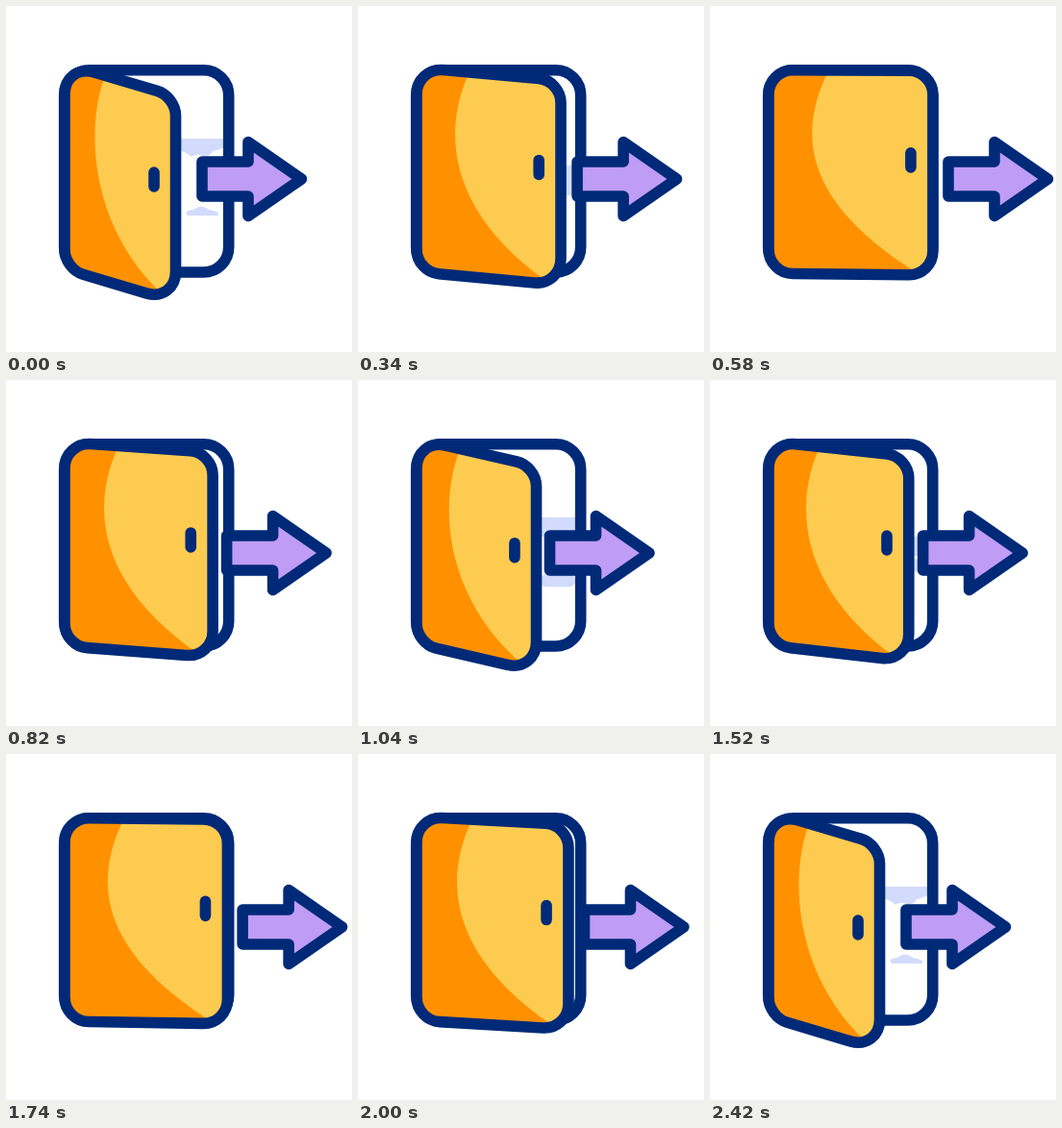
Animation of 360 by 360 pixels, one loop 2820 ms. Source, as an HTML page:

```html
<!DOCTYPE html>
<html lang="en">
<head>
<meta charset="utf-8">
<title>Exit door</title>
<style>
  html, body { margin: 0; width: 100%; height: 100%; overflow: hidden; background: #fff; }
  svg { display: block; width: 100vw; height: 100vh; }
  .line { stroke: #002a78; stroke-width: 11.6; stroke-linejoin: round; stroke-linecap: round; }
</style>
</head>
<body>
<svg viewBox="0 0 360 360">
  <defs><clipPath id="clip"><path id="clipDoor"/></clipPath></defs>
  <g fill="#d2dbfc">
    <g id="wisps">
      <path d="M180 138H226V147Q222 150 215 151Q213 157 205 156Q198 153 193 157Q188 152 180 150Z"/>
      <path d="M187 215Q190 212 195 212Q203 205 211 212Q217 213 221 215V218H189Z"/>
    </g>
    <g id="bars">
      <rect id="upper" x="180" width="48" height="20"/>
      <rect id="lower" x="189" width="37" height="13" rx="6.5"/>
    </g>
  </g>
  <rect class="line" fill="none" x="60.7" y="66.7" width="171" height="210.3" rx="26"/>
  <path id="arrow" class="line" fill="#bf9cf5" d="M0 162H48V141.5L103.5 180L48 218.5V198H0Z"/>
  <path id="door" fill="#ff9100"/>
  <path id="light" fill="#fdcb50" clip-path="url(#clip)"/>
  <path id="edge" class="line" fill="none"/>
  <path id="knob" class="line" fill="none"/>
</svg>
<script>
const LOOP = 2820, MOVING = 2420;
const REST_X = 204;
const $ = id => document.getElementById(id);
const mix = (a, b, p) => a + (b - a) * p;
const ramp = (t, a, b) => Math.min(1, Math.max(0, (t - a) / (b - a)));
const wave = (t, period) => (1 - Math.cos(2 * Math.PI * t / period)) / 2;

// Closed path through the corners, each rounded by its own radius
function roundedPath(corners) {
  const n = corners.length;
  const toward = (from, to, d) => {
    const k = d / Math.hypot(to.x - from.x, to.y - from.y);
    return `${mix(from.x, to.x, k)} ${mix(from.y, to.y, k)}`;
  };
  return corners.map((c, i) => {
    const prev = corners[(i + n - 1) % n], next = corners[(i + 1) % n];
    const handle = c.r * .45;
    return `${i ? 'L' : 'M'}${toward(c, prev, c.r)}C${toward(c, prev, handle)} `
      + `${toward(c, next, handle)} ${toward(c, next, c.r)}`;
  }).join('') + 'Z';
}

// p is 0 when the door is open, 1 when it is shut
function doorPath(p) {
  const left = 61, right = mix(176.5, 232, p);
  const sharp = mix(32, 25, p), blunt = mix(20, 25, p);
  return roundedPath([
    { x: left, y: mix(60, 66.7, p), r: sharp },
    { x: right, y: mix(94, 67.3, p), r: blunt },
    { x: right, y: mix(308, 280, p), r: sharp },
    { x: left, y: mix(273.6, 278.3, p), r: blunt }
  ]);
}

function lightPath(p) {
  const m = (a, b) => mix(a, b, p);
  return `M${m(104, 123)} ${m(70, 68)}C${m(82, 90)} ${m(125, 135)} ${m(86, 98)} ${m(230, 205)} `
    + `${m(165, 219)} ${m(302, 280)}L250 310V50H${m(110, 130)}Z`;
}

function draw(now) {
  const t = Math.min(now % LOOP, MOVING);
  const p = wave(t + 10, MOVING / 2);
  const shape = doorPath(p);
  for (const id of ['clipDoor', 'door', 'edge']) $(id).setAttribute('d', shape);
  $('light').setAttribute('d', lightPath(p));
  $('knob').setAttribute('d', `M${mix(154, 209, p)} ${mix(173, 152.8, p)}v15`);

  // The arrow swings a little slower than the door and settles at both ends
  const settle = wave(1 - ramp(Math.min(t, MOVING - t), 0, 260), 2);
  const x = mix(mix(190.6, 248, wave(t + 27, 1225)), REST_X, settle);
  $('arrow').setAttribute('transform', `translate(${x} 0)`);

  // The bars close up behind the arrow as the door shuts
  const close = ramp(p, .07, .6);
  $('wisps').setAttribute('opacity', settle);
  $('bars').setAttribute('opacity', (1 - settle) * (1 - ramp(p, .62, .69)));
  $('upper').setAttribute('y', mix(138, 166, close));
  $('lower').setAttribute('y', mix(206, 184, close));
}

let start;
function tick(now) {
  if (start === undefined) start = now;
  draw(now - start);
  requestAnimationFrame(tick);
}
draw(0);
requestAnimationFrame(tick);
</script>
</body>
</html>
```
